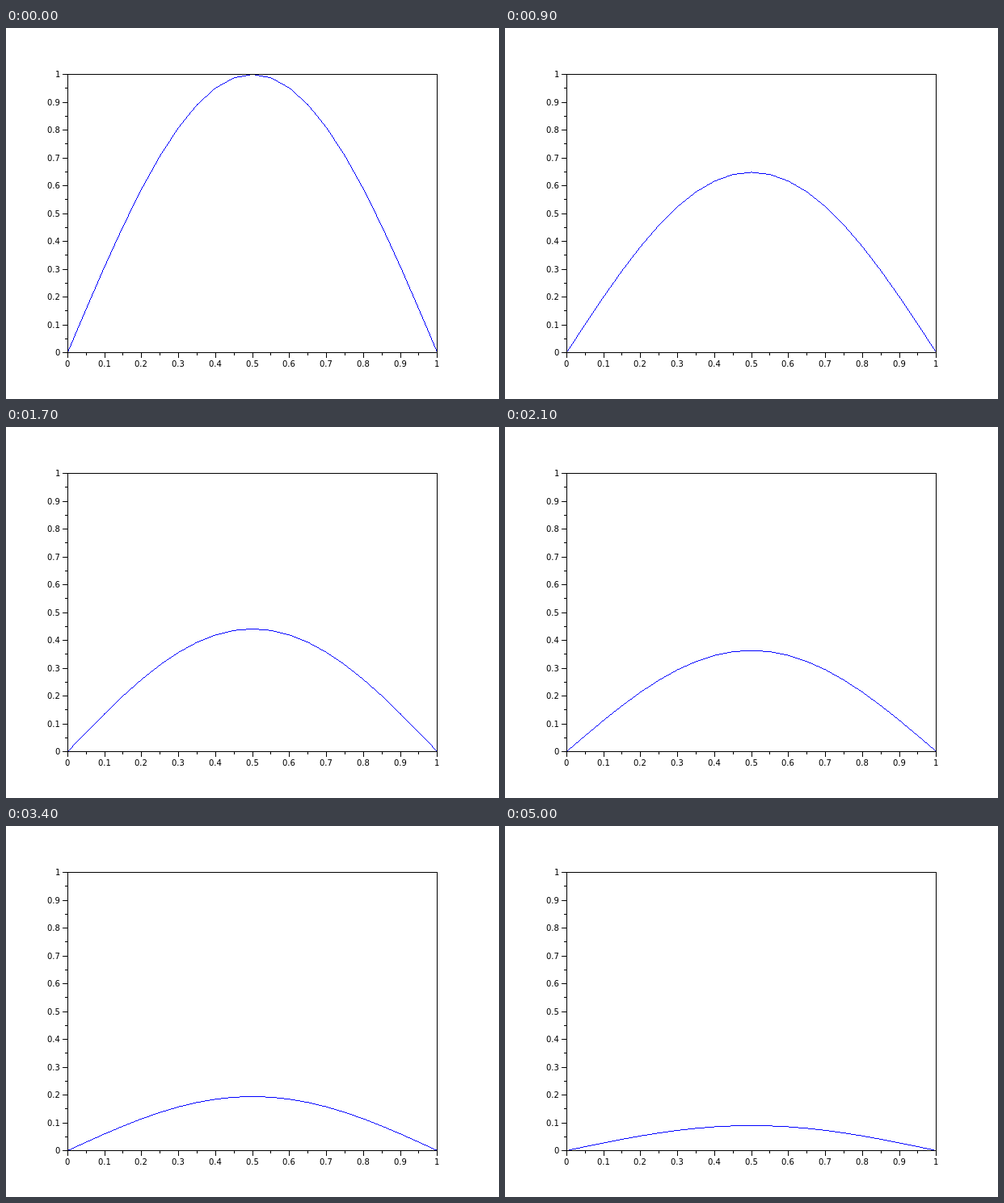
Write an HTML page with a canvas that moves like this. It is 610 px wide and 460 px high and loops after 5100 ms.

```html
<!DOCTYPE html>
<html lang="en">
<head>
<meta charset="utf-8">
<title>Decaying sine profile</title>
<style>
  html, body { margin: 0; width: 100%; height: 100%; overflow: hidden; background: #fff; }
  canvas { display: block; }
</style>
</head>
<body>
<canvas id="stage" width="610" height="460"></canvas>
<script>
const ctx = document.getElementById('stage').getContext('2d');
const STEP_MS = 100, STEPS = 51, SEGMENTS = 20;
const DECAY = 1 / (1 + 0.005 * Math.PI ** 2); // one implicit Euler step of the heat equation
const toX = u => 76.25 + 457.5 * u;
const toY = v => 402.5 - 345 * v;
const dot = (x, y) => ctx.fillRect(Math.floor(x), Math.floor(y), 1, 1);

// Hard-edged line: one pixel per column, or per row when steep.
function line(x0, y0, x1, y1) {
  const dx = x1 - x0, dy = y1 - y0;
  if (Math.abs(dx) >= Math.abs(dy)) {
    for (let x = Math.ceil(x0 - 0.5) + 0.5; x < x1; x++) dot(x, y0 + dy * (x - x0) / dx);
  } else {
    const end = Math.max(y0, y1);
    for (let y = Math.ceil(Math.min(y0, y1) - 0.5) + 0.5; y < end; y++) dot(x0 + dx * (y - y0) / dy, y);
  }
}

function drawCurve(amplitude) {
  ctx.fillStyle = '#00f';
  const height = u => toY(amplitude * Math.sin(Math.PI * u));
  for (let i = 0; i < SEGMENTS; i++) {
    const a = i / SEGMENTS, b = (i + 1) / SEGMENTS;
    line(toX(a), height(a), toX(b), height(b));
  }
}

function drawAxes() {
  ctx.fillStyle = '#000';
  ctx.font = '10px "DejaVu Sans", sans-serif';
  ctx.fillRect(76, 57, 458, 1);
  ctx.fillRect(76, 402, 458, 1);
  ctx.fillRect(76, 57, 1, 346);
  ctx.fillRect(533, 57, 1, 346);
  for (let i = 0; i <= 20; i++) {
    const major = i % 2 === 0, size = major ? 6 : 3;
    const x = Math.floor(toX(i / 20)), y = Math.floor(toY(i / 20));
    ctx.fillRect(x, 403, 1, size);
    ctx.fillRect(76 - size, y, size, 1);
    if (!major) continue;
    const label = String(i / 20), width = ctx.measureText(label).width;
    ctx.fillText(label, Math.round(x - width / 2), 420);
    ctx.fillText(label, Math.round(67 - width), y + 4);
  }
}

function draw(now) {
  const step = Math.floor(now / STEP_MS) % STEPS;
  ctx.fillStyle = '#fff';
  ctx.fillRect(0, 0, 610, 460);
  drawCurve(DECAY ** step);
  drawAxes();
}

const start = performance.now();
function tick() {
  draw(performance.now() - start);
  requestAnimationFrame(tick);
}
tick();
</script>
</body>
</html>
```
